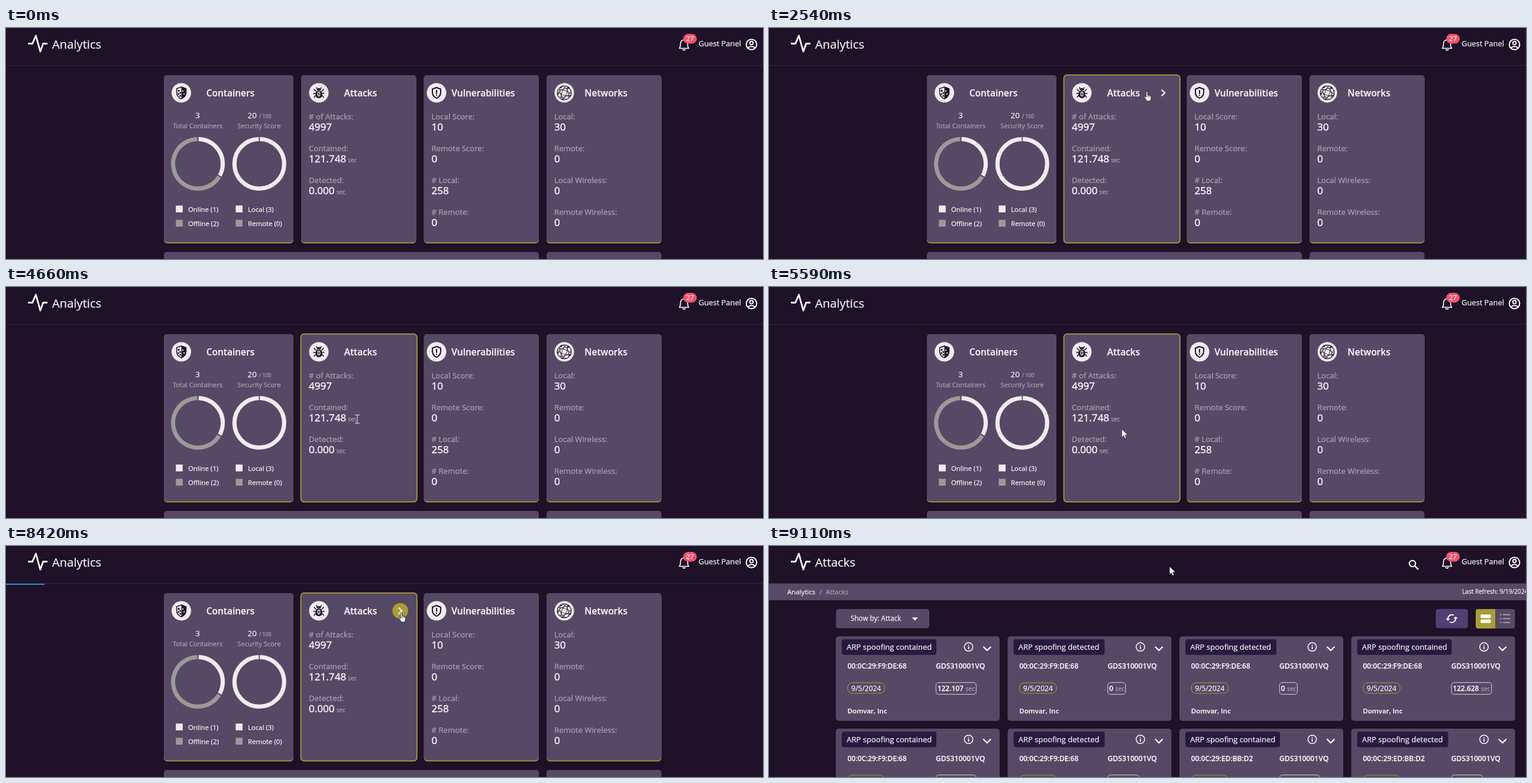
These frames come from a looping animation (1280 px wide and 392 px high, 9570 ms). An HTML page with a canvas:

```html
<!DOCTYPE html>
<html lang="en">
<head>
<meta charset="utf-8">
<title>Analytics dashboard</title>
<style>
  html, body { margin: 0; width: 100%; height: 100%; overflow: hidden; background: #1e1128; }
  canvas { display: block; width: 1280px; height: 392px; }
</style>
</head>
<body>
<canvas id="stage" width="1280" height="392"></canvas>
<script>
const c = document.getElementById('stage').getContext('2d');
const LOOP = 9570, PAGE_TWO = 8520;
const BG = '#1e1128', CARD = '#564965', WHITE = '#f4f1f6', MUTED = '#a9a2b1',
      OLIVE = '#a89d35', GREY = '#9b9a99', DISC = '#f0ecf1', BLUE = '#2299dd', INK = '#17101d';

// ---------- helpers ----------
// a hairline outline gives the text a slightly heavier, rounder look
function text(s, x, y, size, weight = 400, color = WHITE, align = 'left') {
  c.font = `${weight} ${size}px "Open Sans", "Noto Sans", sans-serif`;
  c.fillStyle = c.strokeStyle = color;
  c.textAlign = align;
  c.lineJoin = 'round';
  c.lineWidth = weight === 500 ? 0.5 : 0.25;
  c.fillText(s, x, y);
  c.strokeText(s, x, y);
}
function box(x, y, w, h, r, fill, stroke, lw = 1) {
  c.beginPath();
  c.roundRect(x, y, w, h, r);
  if (fill) { c.fillStyle = fill; c.fill(); }
  if (stroke) { c.strokeStyle = stroke; c.lineWidth = lw; c.stroke(); }
}
function circle(x, y, r, fill, stroke, lw = 1) {
  box(x - r, y - r, 2 * r, 2 * r, r, fill, stroke, lw);
}
function arc(x, y, r, from, to, color, lw) {
  const rad = d => (d - 90) * Math.PI / 180;
  c.beginPath();
  c.arc(x, y, r, rad(from), rad(to));
  c.strokeStyle = color;
  c.lineWidth = lw;
  c.stroke();
}
// SVG path drawn at an offset
function shape(d, x, y, fill, stroke, lw = 1) {
  const p = new Path2D(d);
  c.save();
  c.translate(x, y);
  c.lineJoin = c.lineCap = 'round';
  if (fill) { c.fillStyle = fill; c.fill(p); }
  if (stroke) { c.strokeStyle = stroke; c.lineWidth = lw; c.stroke(p); }
  c.restore();
}
// linear interpolation through [time, a, b...] keys
function track(keys, t) {
  if (t <= keys[0][0]) return keys[0].slice(1);
  for (let i = 1; i < keys.length; i++) {
    const a = keys[i - 1], b = keys[i];
    if (t < b[0]) {
      const k = (t - a[0]) / (b[0] - a[0]);
      return a.slice(1).map((v, j) => v + (b[j + 1] - v) * k);
    }
  }
  return keys[keys.length - 1].slice(1);
}

// ---------- header ----------
function header(title) {
  shape('M38.3 26.5H44.7L50.5 13L58 40L62.8 26.5H69', 0, 0, null, '#fff', 2.8);
  text(title, 78, 35, 20.2);
  shape('M1138.5 34.5H1154.5C1152.5 32.5 1152.5 31 1152.5 27C1152.5 22.5 1150 20.2 1146.5 20.2C1143 20.2 1140.5 22.5 1140.5 27C1140.5 31 1140.5 32.5 1138.5 34.5Z M1144.3 36.7Q1146.5 38.6 1148.7 36.7 M1146.5 18.6V20', 0, 0, null, '#fff', 1.6);
  box(1145, 10, 23, 16.5, 8.2, '#f8506b');
  text('27', 1156.5, 22.2, 11.6, 400, '#fff', 'center');
  text('Guest Panel', 1171, 31, 12.9);
  circle(1260.5, 28, 8.8, null, '#fff', 2);
  circle(1260.5, 25.6, 2.8, null, '#fff', 1.9);
  shape('M1254.6 33.6Q1260.5 29 1266.4 33.6', 0, 0, null, '#fff', 2);
}

// ---------- dashboard ----------
function containerIcon(x, y) {
  shape('M0-10L8-7V-1C8 4.5 4.8 8.2 0 10.2C-4.8 8.2-8 4.5-8-1V-7Z', x, y, null, BG, 1.5);
  shape('M0-10L8-7V-1C8 4.5 4.8 8.2 0 10.2Z', x, y, BG);
  shape('M-6-5h3v3h-3zM-3-1h2.5v2.5h-2.5zM-6 1h2.5v2.5h-2.5zM-3 4h2.5v2.5h-2.5z', x, y, BG);
  shape('M1.5-4h2v2h-2zM3.5 1h2v2h-2z', x, y, DISC);
}
function bugIcon(x, y) {
  shape('M-5-3L-8-6M5-3L8-6M-5 1H-9M5 1H9M-5 4L-8 7.5M5 4L8 7.5M-2.5-6L-4-9M2.5-6L4-9', x, y, null, BG, 1.6);
  shape('M-3.6-4.6C-3.6-9 3.6-9 3.6-4.6Z', x, y, BG);
  box(x - 5.6, y - 4, 11.2, 13, 5.4, BG);
  box(x - 1.6, y - 1.5, 3.2, 7, 1.6, null, DISC, 1.4);
}
function alertIcon(x, y) {
  shape('M0-9L7-6.3V-1C7 4 4.3 7.2 0 9.2C-4.3 7.2-7 4-7-1V-6.3Z', x, y, null, BG, 2);
  shape('M0-4V1M0 4V4.1', x, y, null, BG, 2.1);
}
function globeIcon(x, y) {
  circle(x, y, 12, null, BG, 1);
  c.lineWidth = 0.9;
  for (let i = 0; i < 4; i++) {
    c.beginPath();
    c.ellipse(x, y, 12, 4 + i % 2 * 2.5, 0.35 + i * Math.PI / 4, 0, 7);
    c.stroke();
  }
  for (const a of [0.5, 1.8, 3, 4.2, 5.4])
    circle(x + 11 * Math.cos(a), y + 11 * Math.sin(a), 1.5, BG);
}

function panel(x, w, hover) {
  if (hover) {
    box(x - 1, 79, w + 3, 286.5, 6, CARD);
    box(x - 0.5, 79.7, w + 1.8, 285, 5.5, null, OLIVE, 1.7);
  } else {
    box(x, 80, w, 285.4, 5.5, OLIVE);
    box(x, 80, w, 283.8, 5.5, CARD);
  }
}
function stats(x, rows) {
  rows.forEach(([label, value, unit], i) => {
    const y = 155 + i * 54;
    text(label, x, y, 13.2, 400, MUTED);
    text(value, x, y + 19, 17.1, 500);
    if (unit) {
      const w = c.measureText(value).width;
      text(unit, x + w + 3, y + 19, 10, 400, MUTED);
    }
  });
}
function legend(x, y, color, label) {
  box(x, y, 11.6, 11.6, 0, color);
  text(label, x + 20.7, y + 10.6, 11.4);
}

function dashboard(t, hover) {
  header('Analytics');
  c.fillStyle = '#342940';
  c.fillRect(0, 63, 1280, 1);
  panel(267, 219);
  panel(499, 194.5, hover);
  panel(706.7, 194.3);
  panel(914, 194.3);
  box(267, 380, 634, 40, 5, CARD);
  box(914, 380, 194.3, 40, 5, CARD);

  for (const [x, icon] of [[296.5, containerIcon], [529, bugIcon], [728, alertIcon], [944, globeIcon]]) {
    circle(x, 110, 16.5, DISC);
    icon(x, 110);
  }
  text('Containers', 379.5, 116, 15.5, 600, WHITE, 'center');
  text('Attacks', 599.5, 116, 15.5, 600, WHITE, 'center');
  text('Vulnerabilities', 807, 116, 15.5, 600, WHITE, 'center');
  text('Networks', 1014.5, 116, 15.5, 600, WHITE, 'center');

  text('3', 324, 153, 13.4, 400, WHITE, 'center');
  text('20', 408.5, 153, 13.4);
  text('/ 100', 428, 153, 8.8, 400, MUTED);
  text('Total Containers', 324, 170, 11.1, 400, MUTED, 'center');
  text('Security Score', 428, 170, 11.2, 400, MUTED, 'center');
  arc(324.5, 230.5, 42, 1.5, 118.5, DISC, 7);
  arc(324.5, 230.5, 42, 121.5, 358.5, GREY, 7);
  arc(428.3, 230.5, 42, 1.2, 358.8, DISC, 7);
  legend(287.2, 301.3, DISC, 'Online (1)');
  legend(388.4, 301.3, DISC, 'Local (3)');
  legend(287.2, 325.5, GREY, 'Offline (2)');
  legend(388.4, 325.5, GREY, 'Remote (0)');

  stats(512, [['# of Attacks:', '4997'], ['Contained:', '121.748', 'sec'], ['Detected:', '0.000', 'sec']]);
  stats(719.5, [['Local Score:', '10'], ['Remote Score:', '0'], ['# Local:', '258'], ['# Remote:', '0']]);
  stats(927, [['Local:', '30'], ['Remote:', '0'], ['Local Wireless:', '0'], ['Remote Wireless:', '0']]);

  if (t >= 6020) circle(666.7, 110, 13.3, OLIVE);
  if ((t >= 2130 && t < 3010) || t >= 5880)
    shape('M664.3 105.3L669.3 110L664.3 114.8', 0, 0, null, '#fff', 2.1);
}

// ---------- attack list ----------
const MAC_A = '00:0C:29:F9:DE:68', MAC_B = '00:0C:29:ED:BB:D2';
const ATTACKS = [
  ['contained', MAC_A, '122.107', 68], ['detected', MAC_A, '0', 30],
  ['detected', MAC_A, '0', 30], ['contained', MAC_A, '122.628', 68],
  ['contained', MAC_A, '121.514', 68], ['detected', MAC_A, '0.000', 53],
  ['contained', MAC_B, '121.902', 68], ['detected', MAC_B, '0.000', 53]
];

function attackCard([kind, mac, value, pill], i) {
  c.save();
  c.translate(113 + i % 4 * 290.5, 153.3 + Math.floor(i / 4) * 156.8);
  box(0, 0, 277, 143.5, 5, CARD);
  box(10, 5, kind === 'contained' ? 160 : 154, 26.5, 4, '#281a3f');
  text('ARP spoofing ' + kind, 18.3, 22.7, 13);
  circle(224.5, 18, 7.2, null, '#fff', 1.5);
  shape('M224.5 17.6V21.3M224.5 14.8V14.9', 0, 0, null, '#fff', 1.7);
  shape('M250 18.2L255.8 24L261.6 18.2', 0, 0, null, '#fff', 2.3);
  text(mac, 19.8, 54.8, 11.9, 600);
  text('GDS310001VQ', 169, 54.8, 12.2, 600);
  box(20, 78.7, 62.5, 18, 8, null, OLIVE, 1);
  text('9/5/2024', 26.3, 92.5, 12);
  box(169.3, 78.4, pill, 20, 4.5, null, '#d8d3dc', 1);
  text(value, 171.8, 92.5, 11.9, 600);
  const w = c.measureText(value).width;
  text('sec', 171.8 + w + 3.5, 92.5, 10.4, 400, MUTED);
  text('Domvar, Inc', 19.8, 130.3, 11.5, 600);
  c.restore();
}

function refreshIcon(x, y) {
  c.save();
  c.translate(x, y);
  c.scale(0.93, 0.93);
  for (let i = 0; i < 2; i++) {
    shape('M7-4L3 0H6C6 3.3 3.3 6 0 6C-1 6-2 5.75-2.8 5.3L-4.3 6.8C-3 7.5-1.6 8 0 8C4.4 8 8 4.4 8 0H11Z', 0, 0, '#fff');
    c.rotate(Math.PI);
  }
  c.restore();
}

function attackList() {
  header('Attacks');
  circle(1088, 29.8, 5.2, null, '#fff', 2.1);
  shape('M1092 33.8L1097.3 39.2', 0, 0, null, '#fff', 2.4);
  c.fillStyle = CARD;
  c.fillRect(0, 63.5, 1280, 28.5);
  text('Analytics', 30.7, 82, 11.6);
  text('/', 85.5, 82, 11.6, 400, MUTED);
  text('Attacks', 96, 82, 11.4, 400, MUTED);
  text('Last Refresh: 9/19/2024', 1172, 81.2, 10.15);

  box(113.3, 107, 157.7, 32.6, 4.5, CARD);
  text('Show by: Attack', 138, 127.2, 11.7);
  shape('M241.5 121.2H252L246.7 126.4Z', 0, 0, '#fff');

  box(1127.3, 107, 54.5, 32.6, 4.5, '#503f73');
  refreshIcon(1154.5, 123.3);

  box(1195, 107, 33, 33, [4, 0, 0, 4], OLIVE);
  box(1228, 107, 33.3, 33, [0, 4, 4, 0], CARD);
  box(1203.3, 116.3, 17.2, 6, 1.5, '#fff');
  box(1203.3, 124.5, 17.2, 6, 1.5, '#fff');
  for (let i = 0; i < 3; i++) {
    const y = 116.6 + i * 6.6;
    circle(1237.3, y, 1.3, MUTED);
    box(1241, y - 0.9, 12.5, 1.8, 0, MUTED);
  }
  ATTACKS.forEach(attackCard);
}

// ---------- loading bar ----------
function loadingBar(t) {
  if (t < 8350 || t >= 9000) return;
  const [w] = track([[8350, 8], [8420, 62], [8520, 378], [8630, 790], [8740, 1280]], t);
  c.save();
  c.globalAlpha = Math.min(1, (9000 - t) / 200);
  c.fillStyle = BLUE;
  c.fillRect(0, t < PAGE_TWO ? 64 : 92, w, 1.8);
  c.restore();
}

// ---------- pointer ----------
const POINTER = [
  [1020, 1013, 2], [1230, 951, 34], [1430, 951, 34], [1600, 915, 12], [1750, 860, 6],
  [1900, 790, 30], [2050, 705, 75], [2150, 660, 100], [2250, 635, 103], [2330, 626, 101],
  [2400, 624, 100], [2540, 639, 108], [2610, 637, 108], [2680, 630, 106],
  [2880, 630, 106], [3000, 615, 125], [3130, 598, 145], [3270, 591, 154],
  [3860, 591, 154], [4330, 591, 206], [4590, 591, 206], [4660, 594, 224], [4930, 591, 262],
  [5470, 591, 262], [5600, 597, 240], [5850, 630, 165], [6050, 660, 122], [6220, 668.5, 113],
  [8500, 668.5, 113], [8520, 669, 114], [8680, 669, 114], [8800, 671, 96], [9000, 676, 48], [9110, 677.3, 35]
];
const ARROW = 'M0 0V13.4L3.1 10.5L5.3 15.2L7.5 14.2L5.3 9.6H9.6Z';
const HAND = 'M-1.5 1C-1.5-.4 1.3-.4 1.3 1V5.6L5.6 6.5C7.4 7 7.6 8 7.4 9.5L6.5 13.5V16H-1V14.2L-4.5 9.6C-5.2 8.2-3.6 7.4-2.7 8.5L-1.5 9.8Z';
const IBEAM = 'M-3.5-7H-1Q0-7 0-6Q0-7 1-7H3.5M0-6V6M-3.5 7H-1Q0 7 0 6Q0 7 1 7H3.5';

function pointer(t) {
  if (t < 1020) return;
  const [x, y] = track(POINTER, t);
  const hand = (t >= 2110 && t < 3010) || (t >= 5880 && t < PAGE_TWO);
  if (hand) {
    shape(HAND, x, y, '#fff', INK, 0.9);
    shape('M1.3 6V9M3.6 6.6V9.2M5.7 7.2V9.6', x, y, null, INK, 0.7);
  } else if (t >= 4630 && t < 4800) {
    shape(IBEAM, x, y, null, '#d5d0da', 1.1);
  } else {
    shape(ARROW, x, y, '#fff', INK, 0.5);
  }
}

function draw(t) {
  c.fillStyle = BG;
  c.fillRect(0, 0, 1280, 392);
  if (t < PAGE_TWO) dashboard(t, t >= 2080);
  else attackList();
  loadingBar(t);
  pointer(t);
}
const start = performance.now();
function tick() {
  draw((performance.now() - start) % LOOP);
  requestAnimationFrame(tick);
}
tick();
</script>
</body>
</html>
```
